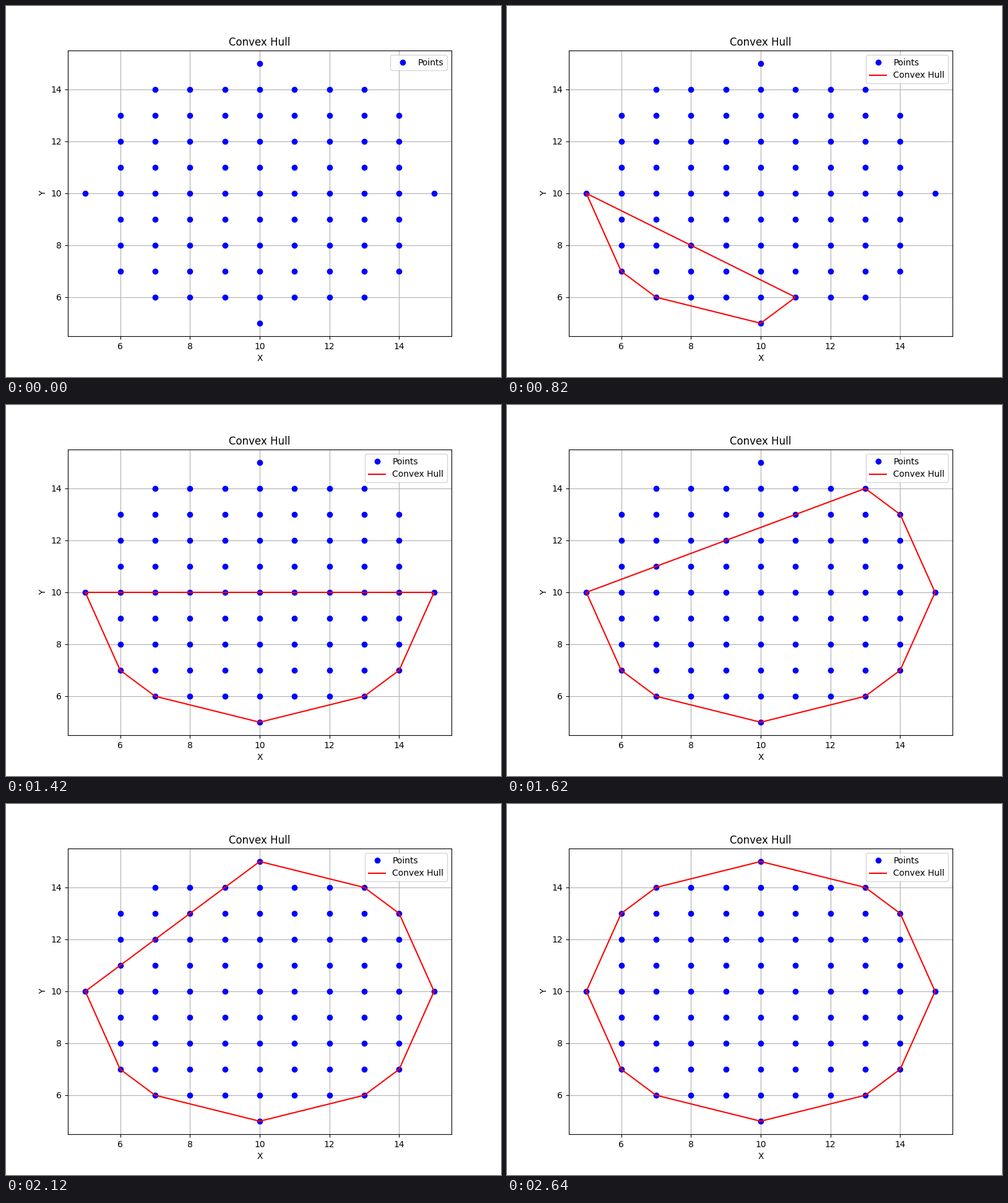
Animation of 800 by 600 pixels, one loop 2.74 s. Source, as a matplotlib script:

```python
import math

import numpy as np
import matplotlib.pyplot as plt
from matplotlib.animation import FuncAnimation

CENTER, RADIUS = 10, 5
TICK = 20  # ms per drawn frame


def reach(d):
    return math.isqrt(RADIUS**2 - d * d)


def turn(a, b, c):
    return (b[0] - a[0]) * (c[1] - b[1]) - (b[1] - a[1]) * (c[0] - b[0])


def scan(rim):
    """Return the hull after every push and every pop."""
    hull, states = [], []
    for p in rim:
        while len(hull) > 1 and turn(hull[-2], hull[-1], p) <= 0:
            hull.pop()
            states.append(hull[:])
        hull.append(p)
        states.append(hull[:])
    return states


offsets = range(-RADIUS, RADIUS + 1)
points = [(CENTER + d, CENTER + e)
          for d in offsets for e in range(-reach(d), reach(d) + 1)]

# Bottom of each column left to right, then the tops back again
lower = [(CENTER + d, CENTER - reach(d)) for d in offsets]
upper = [(CENTER + d, CENTER + reach(d)) for d in offsets][-2:0:-1]
states = [[]] + scan(lower + upper)

# Reaching the lowest and the highest point is only a short flash
holds = [20 if s and s[-1] in ((10, 5), (10, 15)) and s[-1] not in sum(states[:i], [])
         else 100 for i, s in enumerate(states)]
ends = np.cumsum(holds)

fig, ax = plt.subplots(figsize=(8, 6), dpi=100)
dots, = ax.plot(*zip(*points), "bo", label="Points")
outline, = ax.plot([], [], "r-", label="Convex Hull")
ax.set(title="Convex Hull", xlabel="X", ylabel="Y",
       xlim=(4.5, 15.5), ylim=(4.5, 15.5))
ax.grid(True)


def update(i):
    hull = states[np.searchsorted(ends, i * TICK, side="right")]
    closed = hull + hull[:1]
    outline.set_data([p[0] for p in closed], [p[1] for p in closed])
    ax.legend(handles=[dots, outline] if hull else [dots], loc="upper right")
    return dots, outline


anim = FuncAnimation(fig, update, frames=int(ends[-1]) // TICK,
                     interval=TICK, repeat=True, repeat_delay=0)
plt.show()
```
